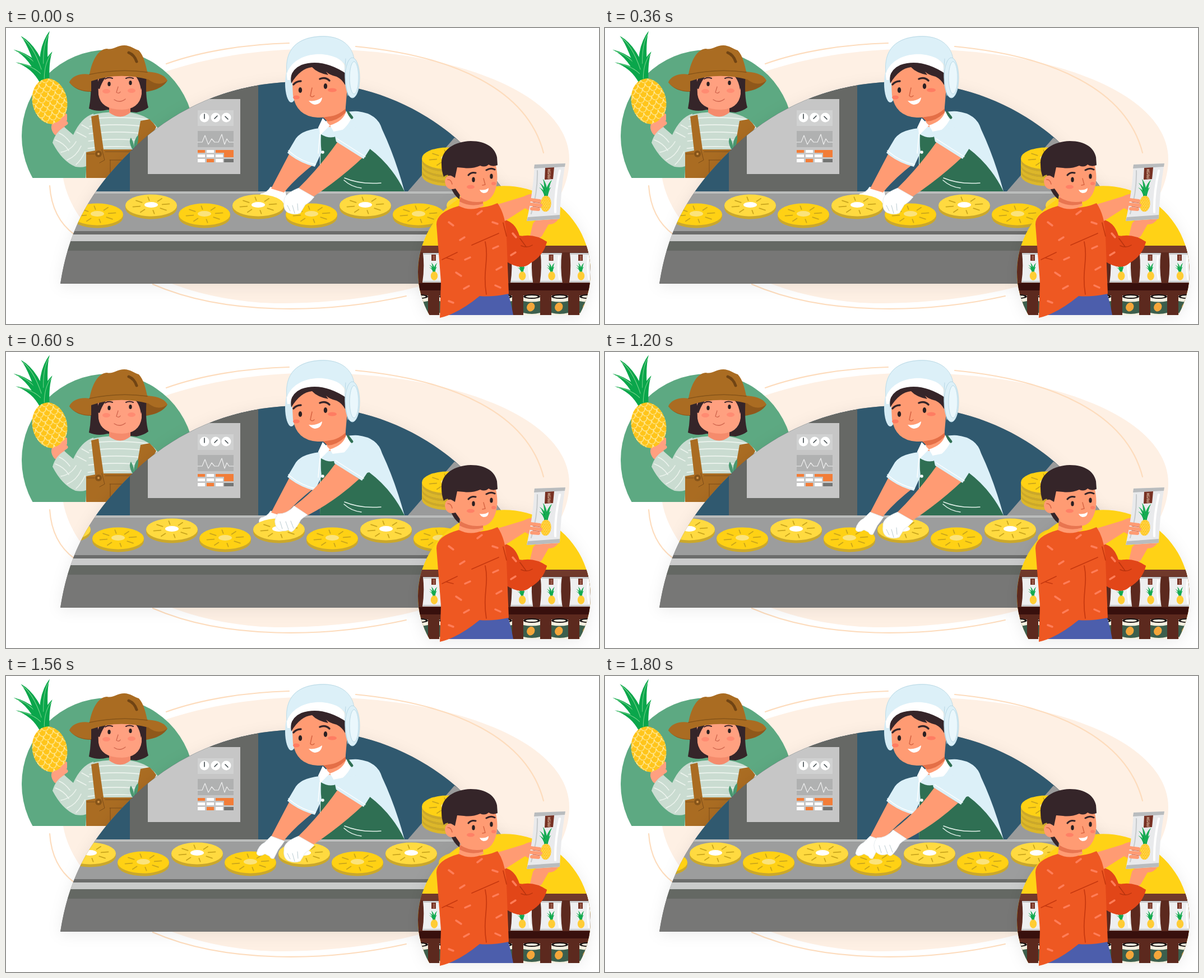
Recreate the animation shown at these times as an HTML page. Size 1058x529 px, loop 2.4 s.

```html
<!DOCTYPE html>
<html lang="en">
<head>
<meta charset="utf-8">
<title>Pineapple factory</title>
<style>
html, body { margin: 0; width: 100%; height: 100%; overflow: hidden; background: #fff; }
svg { display: block; width: 100vw; height: 100vh; }
.line { fill: none; stroke-linecap: round; stroke-linejoin: round; }
.skin { fill: #ff9b73; }
.hair { fill: #352529; }
.cloth { fill: #dcf0f8; }
.white { fill: #fff; }
.green { fill: #2f6f53; }
.brown { fill: #aa6c22; }
.glove { fill: #fff; stroke: #dbe4e8; stroke-width: .7; }
</style>
</head>
<body>
<svg viewBox="0 0 1058 529">
<defs>
  <clipPath id="sceneClip"><path id="sceneShape" d="M97 457C115 340 165 275 235 208C310 138 412 96 525 96C638 96 740 138 815 208C885 275 935 340 953 457Z"/></clipPath>
  <clipPath id="farmClip"><path d="M0 0H400V268H0Z"/></clipPath>
  <clipPath id="shopClip"><path id="shopShape" d="M755.5 513A154 154 0 1 1 1022.5 513Z"/></clipPath>
  <clipPath id="shirtClip"><path d="M150 156Q175 149 205 150Q255 150 275 185L280 268H142Z"/></clipPath>
  <filter id="shade" x="-20%" y="-20%" width="140%" height="140%"><feDropShadow dx="0" dy="4" stdDeviation="13" flood-opacity=".08"/></filter>
  <pattern id="scales" width="13" height="17" patternUnits="userSpaceOnUse">
    <path d="M0 1Q1 9 6.500 9Q12 9 13 1M-6.500 9.500Q-5.500 17 0 17Q5.500 17 6.500 9.500Q7.500 17 13 17" fill="none" stroke="#fff0b0" stroke-width="1.200"/>
  </pattern>
  <g id="pineapple">
    <g id="leaves"></g>
    <ellipse rx="31" ry="41" fill="#ffc51b"/><ellipse rx="31" ry="41" fill="url(#scales)"/>
  </g>
  <g id="bag">
    <path d="M-19-26H19Q16 0 20 27H-20Q-16 0-19-26Z" fill="#eeeff0"/>
    <path d="M-19-26H19V-23H-19ZM-19 24H19L20 27H-20Z" fill="#c9cbcd"/>
    <path d="M14-20Q11 0 15 21" class="line" stroke="#fff" stroke-width="3"/>
    <path d="M-4-23H4V-12H-4Z" fill="#763326"/>
    <path d="M-1-20H2M-1-17H2M-1-14H2" stroke="#d9aa91"/>
    <use href="#pineapple" transform="translate(1 15) scale(.2 .19)"/>
  </g>
  <g id="jar">
    <path d="M-15-17H15V20H-15Z" fill="#f3efdf"/>
    <ellipse cy="-15" rx="15" ry="4" fill="#191415"/><ellipse cy="-15" rx="11" ry="2" fill="#f3efdf"/>
    <path d="M-15-7Q0-4 15-7V14Q0 18-15 14Z" fill="#3c5f4d"/>
    <ellipse cy="4" rx="7" ry="8" fill="#f5a63a" transform="rotate(25)"/>
  </g>
</defs>

<path d="M100 245C100 130 300 45 520 38C775 31 1005 110 1005 235C1005 360 820 492 480 492C250 485 100 360 100 245Z" fill="#fef0e4"/>
<path class="line" stroke="#fddcbd" stroke-width="2.200" d="M286 64C350 41 430 29 505 27M624 33C800 50 930 110 959 223M78 282Q82 340 122 369M262 458C390 514 570 511 714 479"/>

<!-- farmer -->
<g clip-path="url(#farmClip)">
  <circle cx="182" cy="193" r="154" fill="#5da982"/>
  <path d="M84 168Q77 178 86 190L99 198L110 186L104 176L109 164V154Q103 150 99 157Z" fill="#ffa080"/>
  <path d="M156 153Q134 160 120 191L104 177Q88 186 83 205Q100 238 124 248Q141 251 150 243Z" fill="#cadcd1"/>
  <path class="line" stroke="#edf4ee" stroke-width="1.500" d="M95 188Q105 192 114 204M88 200Q104 206 112 219M98 222Q116 219 125 203M109 236Q126 229 134 211M125 244Q135 235 141 221M126 186L143 195M135 173L151 182"/>
  <path d="M150 156Q175 149 205 150Q255 150 275 185L280 268H142Z" fill="#cadcd1"/>
  <g clip-path="url(#shirtClip)"><path id="stripes" class="line" stroke="#edf4ee" stroke-width="1.600"/></g>
  <path class="brown" d="M152 158L165 155L174 217H231L240 166L256 163Q263 169 268 177L242 225V268H143V222L159 219Z"/>
  <path class="line" stroke="#7d4d18" d="M171 217L176 236L167 241M177 221H229M144 225H158M185 236H239M186 236V268"/>
  <circle cx="165" cy="225" r="6" fill="#865419"/><circle cx="165" cy="225" r="2" fill="#d49648"/>
  <path d="M225 216Q218 202 223 196Q229 206 228 216Q228 198 236 191Q237 205 231 216Q236 203 245 204Q243 213 234 219Z" fill="#4a9b73"/>
  <path d="M113 97Q125 114 152 114H250Q278 110 288 94L200 75Z" fill="#8f581b"/>
  <path class="hair" d="M151 82Q153 119 148 144Q164 151 181 146L233 151Q247 148 254 142Q248 122 251 81Z"/>
  <path d="M184 138H222V151Q204 166 184 151Z" fill="#f58b6c"/>
  <path d="M164 91Q180 77 203 82Q229 77 242 93V118Q238 145 207 146Q169 146 165 119Z" fill="#ffa080"/>
  <path class="hair" d="M163 108Q162 80 187 80Q174 88 167 109ZM217 79Q237 82 241 111L248 82Z"/>
  <path class="brown" d="M113 97C117 86 133 80 149 83C152 66 161 38 180 37C191 40 198 31 211 31C222 31 229 38 237 40C246 50 249 65 252 78Q282 80 288 94Q272 106 254 92Q200 78 152 95V113Q124 112 113 97Z"/>
  <path class="line" stroke="#865419" stroke-width="1.500" d="M149 83Q201 72 252 79"/>
  <path class="line" stroke="#704414" stroke-width="5" d="M219 44Q229 48 233 60"/>
  <g fill="#2b2022"><ellipse cx="184" cy="100" rx="2.700" ry="4"/><ellipse cx="222" cy="98" rx="2.700" ry="4"/></g>
  <path class="line" stroke="#382328" stroke-width="2" d="M177 91Q183 87 190 90M214 90Q220 87 227 90"/>
  <path class="line" stroke="#cf654d" stroke-width="1.300" d="M200 105L197 115Q202 118 204 114M193 128Q203 135 213 127"/>
  <g fill="#ff8b72"><ellipse cx="179" cy="113" rx="7" ry="4"/><ellipse cx="224" cy="112" rx="7" ry="4"/></g>
</g>
<use href="#pineapple" transform="translate(78 131) rotate(-12)"/>
<path class="line" stroke="#ffa080" stroke-width="7" d="M88 173Q97 171 103 162M93 179L107 170"/>

<!-- factory -->
<use href="#sceneShape" fill="#777776" filter="url(#shade)"/>
<g clip-path="url(#sceneClip)">
  <path d="M90 90H960V292H90Z" fill="#30596f"/>
  <path d="M221 90H450V292H221Z" fill="#666865"/>
  <path d="M253 127H418V261H253Z" fill="#c6c6c6"/>
  <path d="M342 147H406V175H342Z" fill="#d0d1d1"/>
  <path d="M342 184H406V213H342Z" fill="#b0b1b1"/>
  <path class="line" stroke="#eee" stroke-width="1.200" d="M342 204H350L355 192L361 208L367 198L372 204H379L385 190L390 208L394 198L398 204H406"/>
  <g class="white"><circle cx="354" cy="160" r="8.500"/><circle cx="374" cy="160" r="8.500"/><circle cx="393" cy="160" r="8.500"/></g>
  <path class="line" stroke="#40494d" stroke-width="1.600" d="M354 162V154M372 162L377 157M391 158L396 163"/>
  <path class="white" d="M358 218H371V223H358ZM342 226H355V231H342ZM358 226H371V231H358ZM374 226H387V231H374ZM342 234H355V240H342ZM374 234H387V240H374Z"/>
  <path d="M342 218H355V223H342ZM374 218H390V223H374ZM389 218H406V231H389ZM358 234H371V240H358Z" fill="#f27d38"/>
  <path d="M389 234H406V240H389Z" fill="#747574"/>
  <path d="M717 292L800 196L960 292Z" fill="#9a9b9b"/>
</g>

<!-- worker body and head -->
<path class="cloth" d="M560 176Q590 147 628 149Q663 153 671 181Q694 230 711 292H560Z"/>
<path class="green" d="M562 190Q585 204 602 183L640 217L648 215Q688 245 711 292H560Z"/>
<path class="line" stroke="#2f6f53" stroke-width="5" d="M610 151L617 160"/>
<path class="line" stroke="#e4f3ec" stroke-width="1.500" d="M604 268Q632 280 669 277M603 272Q616 284 634 286"/>
<circle cx="565" cy="222" r="2.800" class="white"/>
<path class="skin" d="M563 153L606 140Q605 152 610 159Q591 180 573 176Q576 166 563 153Z"/>
<path d="M564 158Q588 161 606 144V151Q591 166 574 167Z" fill="#e46f47"/>
<path class="white" d="M565 161L557 178V195L578 174ZM578 174Q603 166 607 148L615 164Q606 181 588 191Z"/>
<ellipse cx="509" cy="99" rx="11" ry="34" fill="#d5ebf4"/>
<path class="skin" d="M510 82Q527 50 572 62Q608 69 609 105L606 141Q586 161 556 160Q518 158 512 120Z"/>
<path class="hair" d="M509 99Q504 69 534 62Q575 50 607 78L605 102Q600 92 590 87Q577 84 571 78L575 84Q555 80 546 70Q525 72 509 99Z"/>
<path class="white" d="M502 93C495 57 524 41 559 44Q604 47 609 83Q565 53 527 66Q509 74 507 93Z"/>
<path class="cloth" d="M501 81C496 41 517 14 567 14C607 15 623 42 621 66L608 74Q602 51 565 47C531 45 508 61 501 81Z"/>
<path class="line" stroke="#bedbe6" d="M501 79C497 40 518 15 567 15C604 15 620 38 621 57"/>
<ellipse cx="618" cy="89" rx="13" ry="36" class="cloth" stroke="#b8d8e5"/>
<ellipse cx="621" cy="89" rx="8" ry="29" fill="#eaf7fc" stroke="#b8d8e5"/>
<path class="line" stroke="#b8d8e5" d="M606 55Q602 85 610 121"/>
<g fill="#2b2022"><ellipse cx="525" cy="111" rx="3.200" ry="5"/><ellipse cx="570" cy="104" rx="3.200" ry="5"/></g>
<path class="line" stroke="#352529" stroke-width="3.500" d="M513 101Q518 95 526 95M560 91Q570 87 577 94"/>
<path class="line" stroke="#d86644" stroke-width="1.600" d="M546 107L543 121Q546 125 550 121"/>
<path class="white" d="M540 130Q553 132 564 124Q563 136 551 137Q545 136 540 130Z"/>
<g fill="#ff7c62"><ellipse cx="518" cy="124" rx="6" ry="3.500"/><ellipse cx="582" cy="111" rx="8" ry="3.500"/></g>

<!-- conveyor -->
<g clip-path="url(#sceneClip)">
  <path d="M90 292H960V297H90Z" fill="#bbbdbc"/>
  <path d="M90 296H960V364H90Z" fill="#9c9d9d"/>
  <path d="M90 363H960V369H90Z" fill="#6c6d6c"/>
  <path d="M90 369H960V382H90Z" fill="#cacbcb"/>
  <path d="M90 381H960V398H90Z" fill="#646863"/>
  <path d="M90 398H960V457H90Z" fill="#777776"/>
  <g id="stack"></g>
  <path id="backHand" class="glove" d="M472 284L498 291Q505 310 490 318L455 312Q448 300 455 296Q466 294 472 284Z"/>
  <g id="rings"></g>
</g>

<!-- worker arms -->
<path class="skin" d="M508 220L546 246Q515 270 496 294L473 287Q488 258 508 220Z"/>
<path class="cloth" d="M559 179Q524 183 515 201L502 223Q521 240 551 248L563 222Z"/>
<path class="line" stroke="#fff" stroke-width="1.400" d="M504 219Q523 237 552 244M560 190L557 224"/>
<path id="frontHand" class="glove" d="M473 286L497 295Q492 303 486 310L478 326Q473 328 470 322L462 318Q450 325 447 317Q450 303 462 297Z"/>
<g id="armLow">
  <path class="skin" d="M592 203L637 231Q598 268 549 301L520 288Q558 251 592 203Z"/>
  <path class="cloth" d="M585 185L589 203L638 234L650 215L625 177Z"/>
  <path class="line" stroke="#fff" stroke-width="1.400" d="M591 198L641 230"/>
  <path class="glove" d="M522 286L550 302Q542 312 534 316L525 331Q515 335 503 330Q494 325 496 311Q494 297 522 286Z"/>
  <path class="line" stroke="#bacbd1" d="M502 317L507 327M511 317L515 331M520 314L521 326"/>
</g>
<g id="armHigh">
  <path class="skin" d="M588 199L630 227Q588 266 538 292L513 276Q555 245 588 199Z"/>
  <path class="cloth" d="M582 182L586 199L635 230L647 212L623 177Z"/>
  <path class="line" stroke="#fff" stroke-width="1.400" d="M588 194L638 226"/>
  <path class="glove" d="M514 275L538 291Q530 296 526 300Q520 312 513 319Q508 324 504 318Q492 323 484 315Q475 303 485 289Q501 290 514 275Z"/>
  <path class="line" stroke="#bacbd1" d="M489 303L493 316M499 303L504 317M508 302L513 315"/>
</g>

<!-- shop -->
<use href="#shopShape" fill="#ffd213" filter="url(#shade)"/>
<g clip-path="url(#shopClip)">
  <path d="M730 389H1050V520H730Z" fill="#5c291e"/>
  <path d="M730 389H1050V401H730Z" fill="#70392b"/>
  <g id="goods"></g>
  <path d="M730 456H1050V469H730Z" fill="#38100d"/>
</g>

<!-- boy -->
<path d="M845 476L895 472Q901 490 905 513H782Z" fill="#4c5eac"/>
<path d="M886 342Q908 345 916 371Q940 374 965 382Q959 407 936 420Q920 435 892 417Z" fill="#e24618"/>
<path class="skin" d="M934 375L940 350Q944 341 958 343L986 341Q980 351 968 351L956 372L946 380Z"/>
<path d="M916 373Q941 366 965 382Q959 403 945 410Q930 397 916 373Z" fill="#e24618"/>
<path class="line" stroke="#b9340f" stroke-width="1.500" d="M917 376L928 391M919 389Q930 394 939 388"/>
<path class="skin" d="M878 315L924 301Q935 295 943 297L946 330Q936 328 926 322L884 349Z"/>
<path d="M808 318Q845 327 877 313Q892 335 893 372L897 475Q867 481 845 479Q806 511 774 518Q775 486 776 454L768 351Q768 329 808 318Z" fill="#ee5822"/>
<path class="line" stroke="#c6380f" stroke-width="1.700" d="M778 414L805 401M786 411L798 414M831 388L879 367M855 382C862 414 850 435 857 476M893 372L887 348"/>
<path class="line" stroke="#ff7d58" stroke-width="3.500" d="M790 347L798 353M841 333L849 327M868 347L877 350M810 379L818 374M819 414L828 410M869 394L878 390M803 437L812 443M875 432L884 427M790 488L798 491M817 466L826 461M873 460L882 464M904 367L910 374M901 406L909 401"/>
<path class="hair" d="M788 256Q791 294 809 306L814 250Z"/>
<path class="skin" d="M799 237H872Q879 263 875 282Q869 308 851 311L852 318Q829 329 808 318L811 300L802 287Q785 292 783 274Q784 261 797 264Z"/>
<path d="M810 302Q829 314 851 310V314Q829 321 809 310Z" fill="#e87550"/>
<path class="hair" d="M777 243C776 218 799 203 829 202C858 202 873 215 876 231L877 245Q868 249 861 244Q855 250 846 246Q832 252 817 250L805 249L801 268Q788 258 781 266Q777 256 777 243Z"/>
<g fill="#2b2022"><ellipse cx="834" cy="271" rx="2.700" ry="4.500"/><ellipse cx="866" cy="265" rx="2.700" ry="4.500"/></g>
<path class="line" stroke="#352529" stroke-width="3" d="M825 263Q830 257 838 259M857 254Q865 249 872 253"/>
<path class="line" stroke="#d86644" stroke-width="1.500" d="M852 269L855 280L850 281M788 271Q794 270 796 279"/>
<path class="white" d="M845 289Q854 291 861 286Q861 295 852 295Q847 294 845 289Z"/>
<g fill="#ff8066"><ellipse cx="829" cy="284" rx="7" ry="3.500"/><ellipse cx="870" cy="278" rx="4" ry="3"/></g>

<!-- held bag -->
<path d="M943 244L998 242Q990 287 988 341L929 345Q941 290 943 244Z" fill="#e9eaec"/>
<path d="M943 244L998 242L997 248L942 251ZM931 338L988 334V341L929 345Z" fill="#b9bcbe"/>
<path class="line" stroke="#fff" stroke-width="4" d="M988 255Q979 295 980 329"/>
<path class="line" stroke="#c7cacc" stroke-width="2" d="M948 255Q949 293 937 332"/>
<path d="M962 250L978 249L976 270L961 271Z" fill="#773123"/>
<text x="969" y="257" text-anchor="middle" font-size="6" font-family="'Noto Sans CJK TC','Noto Sans CJK',sans-serif" fill="#f1d9bd">鳳<tspan x="969" dy="6">梨</tspan><tspan x="969" dy="6">乾</tspan></text>
<use href="#pineapple" transform="translate(963 314) rotate(4) scale(.31 .35)"/>
<path class="line" stroke="#ff9b73" stroke-width="6" d="M936 307L952 309M936 315L954 317M938 323L950 324"/>
<path class="line" stroke="#d86644" d="M940 311L954 313M940 319L954 321"/>
</svg>
<script>
const $ = id => document.getElementById(id);
const range = (n, f) => Array.from({ length: n }, (_, i) => f(i)).join('');

// leaves rise along the stem, then bend out to their tips
const leaf = (x, y) => `<path d="M-10-35Q${x * .2 - 9} ${y * .8} ${x} ${y}Q${x * .2 + 8} ${y * .8} 7-35Z" fill="#0aa64b"/>
  <path d="M-1-42Q${x * .2} ${y * .8} ${x * .9} ${y * .96}" class="line" stroke="#7bd38d"/>`;
$('leaves').innerHTML = [[-44, -104], [26, -123], [-26, -125], [-45, -81], [23, -86]].map(p => leaf(...p)).join('');

$('stripes').setAttribute('d', range(9, i => `M140 ${164 + i * 13}Q205 ${154 + i * 13} 285 ${168 + i * 13}`));

const spokes = range(8, i => {
  const a = i * Math.PI / 4 - .17, c = Math.cos(a), s = Math.sin(a);
  return `M${c * 20} ${s * 9}L${c * 33} ${s * 15}`;
});
const ring = (x, y, top, hole, side = '#cba82b') => `<g transform="translate(${x} ${y})">
  <path d="M-46 0V5A46 19.500 0 0 0 46 5V0Z" fill="${side}"/><ellipse rx="46" ry="19.500" fill="${top}"/>
  <path d="${spokes}" class="line" stroke="#c9a51c" stroke-width="1.800"/><ellipse cy="-1" rx="12" ry="5" fill="${hole}"/></g>`;
const PITCH = 191;
$('rings').innerHTML =
  range(5, i => ring(68 + i * PITCH, 317, '#ffda40', '#fff')) +
  range(6, i => ring(-28 + i * PITCH, 333, '#ffd114', '#fbe37b'));
$('stack').innerHTML = range(6, i => ring(788, 258 - i * 5, '#ffd114', '#fbe37b', i % 2 ? '#cba82b' : '#dcb72b'));

const place = (id, x, y) => `<use href="#${id}" x="${x}" y="${y}"/>`;
$('goods').innerHTML = range(6, i => place('bag', 763 + i * 52.4, 428)) + range(7, i => place('jar', 738 + i * 50, 495));

// each pose: conveyor shift, left hand reaching forward, right arm raised
const poses = [[0, 0, 0], [37, 0, 1], [82, 1, 0], [129, 1, 1]];
const show = (id, on) => $(id).setAttribute('visibility', on ? 'visible' : 'hidden');

function draw(now) {
  const [shift, reach, raised] = poses[Math.floor(now / 600) % poses.length];
  $('rings').setAttribute('transform', `translate(${shift})`);
  show('backHand', !reach);
  show('frontHand', reach);
  show('armLow', !raised);
  show('armHigh', raised);
  requestAnimationFrame(draw);
}
draw(performance.now());
</script>
</body>
</html>
```
